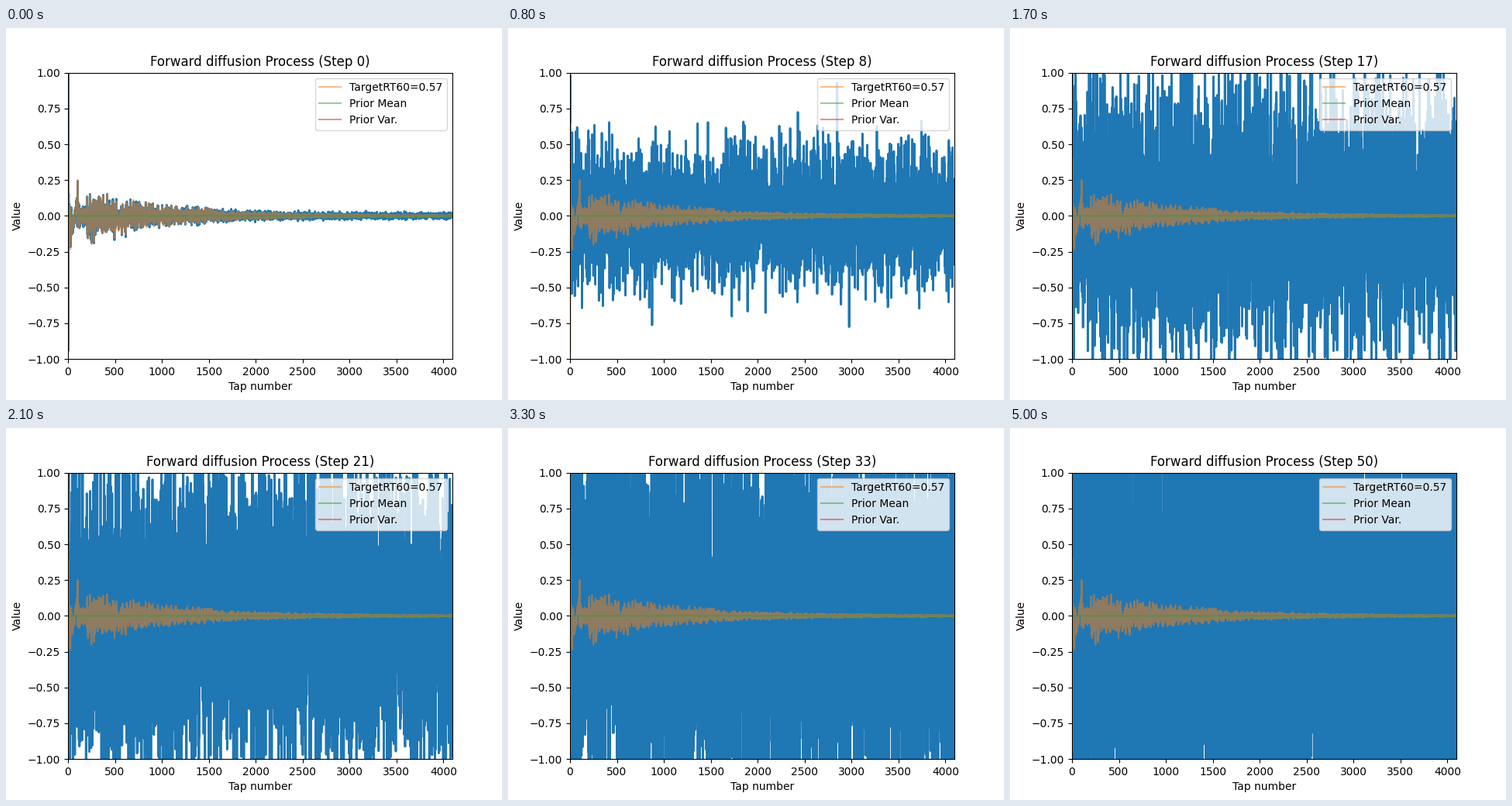
Write a matplotlib script that moves like this. It is 640 px wide and 480 px high and loops after 10000 ms.

```python
import numpy as np
import matplotlib.pyplot as plt
from matplotlib.animation import FuncAnimation

TAPS = 4096
STEPS = 50
FRAMES = 100
n = np.arange(TAPS)

# Variance-preserving noise schedule
alpha_bar = np.cumprod(1 - np.linspace(1e-4, 0.07, STEPS + 1))


def make_response():
    """Direct sound, sparse early reflections, decaying noise tail."""
    rng = np.random.default_rng(7)
    early = np.interp(n, [20, 50, 90, 104, 112, 125, 190, 205],
                      [1.2, 0.3, 0.3, 1.1, 1.1, 0.4, 0.5, 1])
    env = early * (0.092 * np.exp(-n / 900) + 0.002)
    swing = np.interp(n, [30, 50, 95, 115], [0, -0.09, 0.09, 0])
    h = swing + env * np.clip(rng.standard_normal(TAPS), -2.8, 2.8)
    h[:4] = 0, 1, -0.95, 0.4
    return h


response = make_response()


def diffuse(step):
    noise = np.random.default_rng(100 + step).standard_normal(TAPS)
    a = alpha_bar[step]
    return np.sqrt(a) * response + np.sqrt(1 - a) * noise


fig, ax = plt.subplots(figsize=(6.4, 4.8), dpi=100)
signal, = ax.plot(n, diffuse(0), lw=2)
ax.plot(n, response, alpha=0.5, label="TargetRT60=0.57")
ax.plot(n, np.zeros(TAPS), alpha=0.5, label="Prior Mean")
ax.plot([], [], alpha=0.5, label="Prior Var.")
ax.set(xlim=(0, TAPS), ylim=(-1, 1), xlabel="Tap number", ylabel="Value")
ax.legend(loc="upper right")
title = ax.set_title("")


def update(frame):
    step = min(frame, STEPS)
    signal.set_ydata(diffuse(step))
    title.set_text(f"Forward diffusion Process (Step {step})")
    return signal, title


anim = FuncAnimation(fig, update, frames=FRAMES, interval=100, repeat=True)
plt.show()
```
